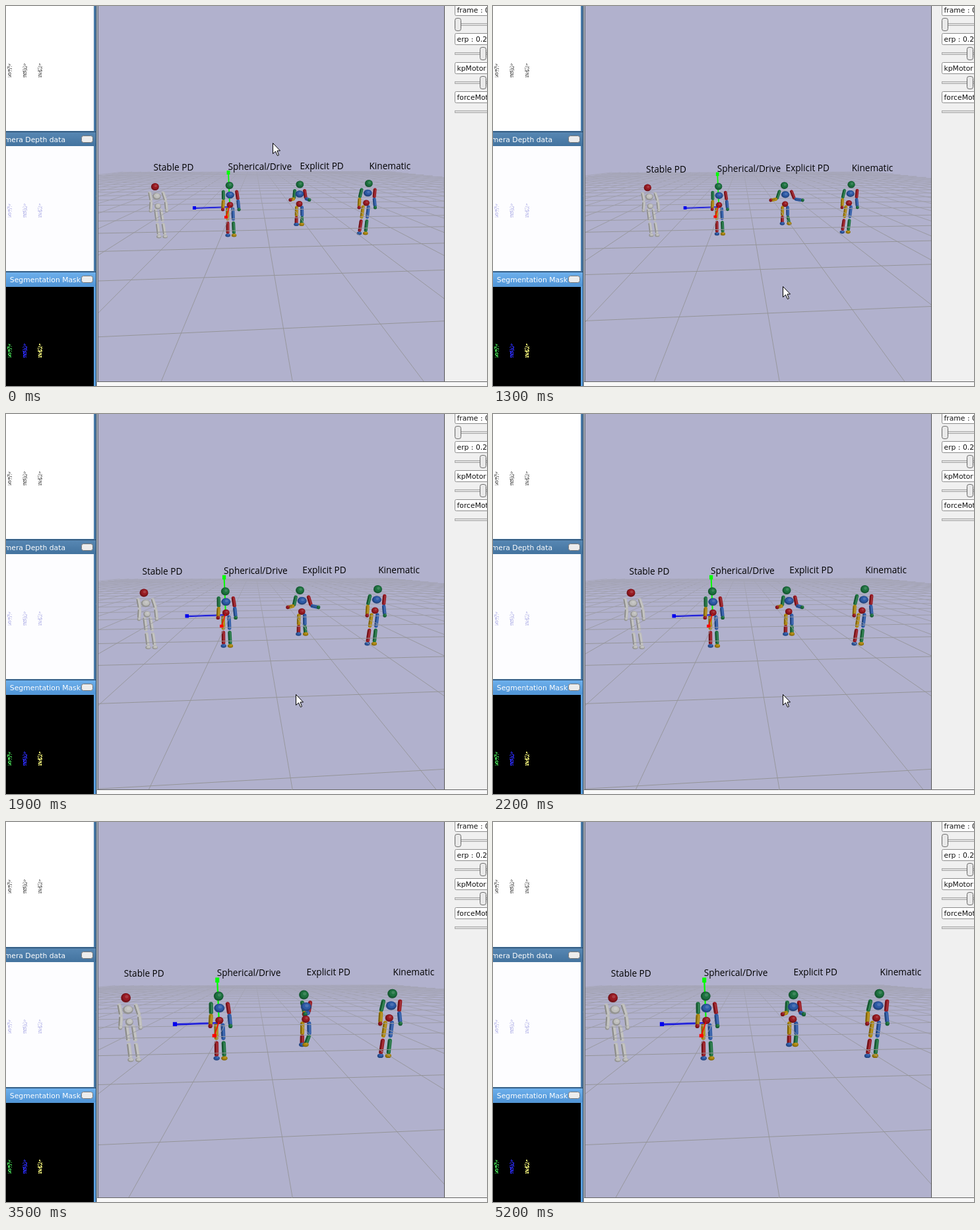
Animation of 729 by 575 pixels, one loop 5.3 s. Source, as an HTML page with a canvas:

```html
<!DOCTYPE html>
<html lang="en">
<head>
<meta charset="utf-8">
<title>Humanoid control viewer</title>
<style>
html, body { margin: 0; width: 100%; height: 100%; overflow: hidden; background: #f0f0f0; }
canvas { display: block; }
</style>
</head>
<body>
<canvas id="stage" width="729" height="575"></canvas>
<script>
const g = document.getElementById('stage').getContext('2d');
const LOOP = 5300, STEP = 100;
const PIVOT = { x: 405, y: 304 };
const GREEN = '#1e7240', BLUE = '#2d5aa6', RED = '#981a22', YELLOW = '#ad870e', GREY = '#bebebc';
const UI_FONT = '10.8px "DejaVu Sans", sans-serif';
const LABEL_FONT = '13.6px "Open Sans", sans-serif';

// Keys are [time, ...values]
const DISTANCE = [[1000, 1], [1500, 1.082], [1700, 1.082], [1800, .914], [2200, .914], [2400, .802]];
const POINTER_PATHS = [
  [[0, 404, 207], [300, 718, 290], [900, 459, 358], [1200, 439, 424], [2600, 439, 424], [3000, 587, 335]],
  [[4700, 190, 40], [5000, 131, 3]]
];

// Colours run from the trunk outwards
const COLOURED = { head: GREEN, chest: BLUE, pelvis: RED,
  arms: [[GREEN, YELLOW, RED], [RED, BLUE, GREEN]],
  legs: [[YELLOW, RED, BLUE], [BLUE, GREEN, YELLOW]] };
const PLAIN = [GREY, GREY, GREY];
const COLOURLESS = { head: RED, chest: GREY, pelvis: GREY, arms: [PLAIN, PLAIN], legs: [PLAIN, PLAIN] };

const STANDING = [
  { x: 230, y: 303, tilt: .14, paint: COLOURLESS },
  { x: 339.5, y: 301, tilt: .03, paint: COLOURED },
  { x: 546, y: 298, tilt: -.13, paint: COLOURED }
];

function sample(keys, t) {
  const next = keys.findIndex(k => k[0] > t);
  if (next <= 0) return keys[next ? keys.length - 1 : 0].slice(1);
  const a = keys[next - 1], b = keys[next];
  const f = (t - a[0]) / (b[0] - a[0]);
  return a.slice(1).map((v, i) => v + (b[i + 1] - v) * f);
}

// The hopping figure turns round, which opens and closes its arms
function hopping(t) {
  const turn = 2 * Math.PI * t / LOOP, open = Math.cos(turn - 1.42);
  return { x: 444.5, y: 299.5, sway: 2 * Math.cos(turn) - 1.2, shoulder: 7 + 2 * open,
    elbow: 8 + 6 * open, hands: [-13 - 11 * open, 12 + 15 * open], handY: -6,
    kneeY: 19, footY: 31, feet: [-4.5, 3 + 3.5 * open], paint: COLOURED };
}

function pose({ x, y, tilt = 0, sway = 0, shoulder = 10, elbow = 11, hands = [-12, 12.5], handY = 7,
  kneeY = 24, footY = 46, feet = [-4.7, 4.7], paint }) {
  const at = (dx, dy) => [x + dx + tilt * dy, y + dy];
  const sides = [-1, 1];
  return { paint, head: at(sway, -29.5), chest: at(.4, -15), pelvis: at(0, 0),
    arms: sides.map((s, i) => [at(shoulder * s + .5, -22), [x + 1 + elbow * s, y - 8], [x + 1 + hands[i], y + handY]]),
    legs: sides.map((s, i) => [at(4 * s, 3), at(4.3 * s, kneeY), at(feet[i], footY)]) };
}

function box(x, y, w, h, fill) {
  g.fillStyle = fill;
  g.fillRect(x, y, w, h);
}

function line(x1, y1, x2, y2, color, width = 1) {
  g.strokeStyle = color;
  g.lineWidth = width;
  g.beginPath();
  g.moveTo(x1, y1);
  g.lineTo(x2, y2);
  g.stroke();
}

function roundBox(x, y, w, h, radius, fill, edge) {
  g.fillStyle = fill;
  g.strokeStyle = edge;
  g.lineWidth = 1;
  g.beginPath();
  g.roundRect(x + .5, y + .5, w, h, radius);
  g.fill();
  g.stroke();
}

function write(text, x, y, font, color, align = 'left') {
  g.font = font;
  g.fillStyle = color;
  g.textAlign = align;
  g.fillText(text, x, y);
}

function ball([x, y], rx, ry, color) {
  const oval = (dx, dy, size, fill) => {
    g.fillStyle = fill;
    g.beginPath();
    g.ellipse(x + dx, y + dy, rx * size, ry * size, 0, 0, 7);
    g.fill();
  };
  oval(0, 0, 1, color);
  oval(0, 0, 1, 'rgba(0,0,0,.22)');
  oval(.6, -.7, .75, color);
  oval(1, -1.3, .35, 'rgba(255,255,255,.15)');
}

function bone(a, b, from, to, color) {
  const at = f => [a[0] + (b[0] - a[0]) * f, a[1] + (b[1] - a[1]) * f];
  const [x1, y1] = at(from), [x2, y2] = at(to);
  g.lineCap = 'round';
  line(x1, y1, x2, y2, color, 5);
  line(x1 - 1.6, y1, x2 - 1.6, y2, 'rgba(0,0,0,.28)', 1.6);
  line(x1 + .8, y1, x2 + .8, y2, 'rgba(255,255,255,.13)', 1.4);
  g.lineCap = 'butt';
}

function limb([a, b, c], [upper, lower, end], endWidth) {
  bone(a, b, .14, .87, upper);
  bone(b, c, .16, .8, lower);
  ball(c, endWidth, 2.5, end);
}

function legs(f) {
  f.legs.forEach((leg, i) => limb(leg, f.paint.legs[i], 3.8));
}

function upperBody(f) {
  f.arms.forEach((arm, i) => limb(arm, f.paint.arms[i], 2.5));
  ball(f.pelvis, 4.9, 4.5, f.paint.pelvis);
  ball(f.chest, 6.4, 5.3, f.paint.chest);
  ball(f.head, 5.9, 5.6, f.paint.head);
}

function grid(distance) {
  const zoom = 1 / distance, vx = 376, vy = 228, rows = 23, half = 15;
  const near = 2.22 + 6.85 * (distance - 1);
  const drop = z => 1 / (z * .00172 * zoom);
  const slope = i => .171 + i * .585 * zoom;
  const far = drop(near + rows);
  const fade = g.createLinearGradient(0, vy + far, 0, 350);
  fade.addColorStop(0, '#a5a5b7');
  fade.addColorStop(1, '#949498');
  for (let j = -2; j <= rows; j++) {
    if (near + j < .3) continue;
    const d = drop(near + j);
    const end = side => {
      const dx = Math.max(-300, Math.min(300, d * slope(side * half)));
      return [vx + dx, vy + d * (1 - .000175 * dx)];
    };
    line(...end(-1), ...end(1), fade);
  }
  for (let i = -half; i <= half; i++) {
    const k = slope(i);
    line(vx + k * far, vy + far, vx + k * 350, vy + 350, fade, .9);
  }
}

function axes() {
  line(337, 252, 339, 300, '#0f0', 1.8);
  box(334.6, 249, 4.8, 6, '#0f0');
  line(286, 305.3, 339, 303.5, '#00d', .9);
  line(286, 306.5, 339, 304.8, '#00d', .9);
  box(283, 303, 5, 5, '#00e');
}

function redAxis() {
  line(339, 303, 333.5, 319, '#f00', 1.2);
  box(331, 317.5, 5, 4, '#f00');
}

function label(text, x, y, zoom) {
  write(text, PIVOT.x + (x - PIVOT.x) * zoom - .5, PIVOT.y + (y - PIVOT.y) * zoom + 5, LABEL_FONT, '#000');
}

function scene(t) {
  const [distance] = sample(DISTANCE, t), zoom = 1 / distance;
  const figures = [...STANDING, hopping(t)].map(pose);
  const zoomed = draw => {
    g.save();
    g.translate(PIVOT.x, PIVOT.y);
    g.scale(zoom, zoom);
    g.translate(-PIVOT.x, -PIVOT.y);
    draw();
    g.restore();
  };
  g.save();
  g.beginPath();
  g.rect(140, 0, 524, 568);
  g.clip();
  box(140, 0, 524, 568, '#b1b1cd');
  // The floor is see-through, so its lines cross the legs
  zoomed(() => figures.forEach(legs));
  grid(distance);
  zoomed(() => {
    axes();
    figures.forEach(upperBody);
    redAxis();
  });
  label('Stable PD', 224, 244, zoom);
  label('Spherical/Drive', 337, 243, zoom);
  label('Explicit PD', 446, 242, zoom);
  label('Kinematic', 551, 242, zoom);
  g.restore();
}

// A coarse speckled silhouette
function miniature(x, y, color, seed) {
  for (let row = 0; row < 21; row++) {
    const half = row < 4 ? 1 : row < 12 ? 3 : 2;
    for (let dx = -half; dx <= half; dx++) {
      const noise = Math.sin(row * 12.99 + dx * 78.23 + seed * 37.7) * 43758.5;
      if (noise - Math.floor(noise) > .42) box(x + dx, y + row, 1, 1, color);
    }
  }
}

function titleBar(y, top, bottom, text, right) {
  const shade = g.createLinearGradient(0, y, 0, y + 21);
  shade.addColorStop(0, top);
  shade.addColorStop(1, bottom);
  box(0, y, 136, 21, shade);
  line(0, y - .5, 137, y - .5, '#2b4a68');
  write(text, right, y + 15, UI_FONT, '#fff', 'right');
  roundBox(114, y + 5, 17, 10, 3, '#ececec', '#777');
}

function leftPanels() {
  box(0, 0, 140, 575, '#a2a9b4');
  box(0, 0, 136, 402, '#4a7ba8');
  box(0, 402, 136, 173, '#5a9fdf');
  box(0, 0, 133, 189, '#fff');
  box(0, 212, 133, 189, '#fdfdff');
  box(0, 425, 133, 150, '#000');
  titleBar(191, '#5787b3', '#43739f', 'Synthetic Camera Depth data', 90);
  titleBar(403, '#6eb0ec', '#4f94d6', 'Segmentation Mask', 113);
  line(136.5, 0, 136.5, 575, '#2d4b69');
  line(139.5, 0, 139.5, 568, '#666b75');
  ['#3fc44c', '#2929e6', '#e6e674'].forEach((color, i) => {
    const x = 5 + 23 * i;
    miniature(x, 87, '#8c8c8c', i);
    miniature(x, 299, '#cdcdf0', i);
    miniature(x, 511, color, i);
  });
}

function control(row, text, knob) {
  const y = 6 + 44 * row;
  roundBox(680, y - 9, 60, 17, 2, '#fff', '#8c8c8c');
  write(text, 683.5, y + 4, UI_FONT, '#111');
  box(680, y + 20, 49, 4, '#aaa');
  box(681, y + 21, 48, 2, '#dedede');
  if (knob) roundBox(knob - 5, y + 12, 9, 19, 3, '#e9e9e9', '#666');
}

function rightPanel() {
  box(664, 0, 65, 568, '#f0f0f0');
  line(664.5, 0, 664.5, 568, '#555');
  control(0, 'frame : 0', 685);
  control(1, 'erp : 0.2', 723);
  control(2, 'kpMotor : 0.2', 723);
  control(3, 'forceMotor : 0');
  box(138, 568, 591, 7, '#f8f8f8');
  line(138, 568.5, 729, 568.5, '#666');
}

function pointer(t) {
  const path = POINTER_PATHS.find(p => t >= p[0][0] && t <= p[p.length - 1][0]);
  if (!path) return;
  const [x, y] = sample(path, t).map(Math.round);
  g.save();
  g.translate(x + .5, y + .5);
  g.fillStyle = '#fff';
  g.strokeStyle = '#000';
  g.lineWidth = 1;
  const arrow = new Path2D('M0 0V16L4 12.5L7 19L9 18L6.5 11.5H11Z');
  g.fill(arrow);
  g.stroke(arrow);
  g.restore();
}

function frame() {
  const t = Math.floor(performance.now() % LOOP / STEP) * STEP;
  leftPanels();
  rightPanel();
  scene(t);
  pointer(t);
  requestAnimationFrame(frame);
}
frame();
</script>
</body>
</html>
```
